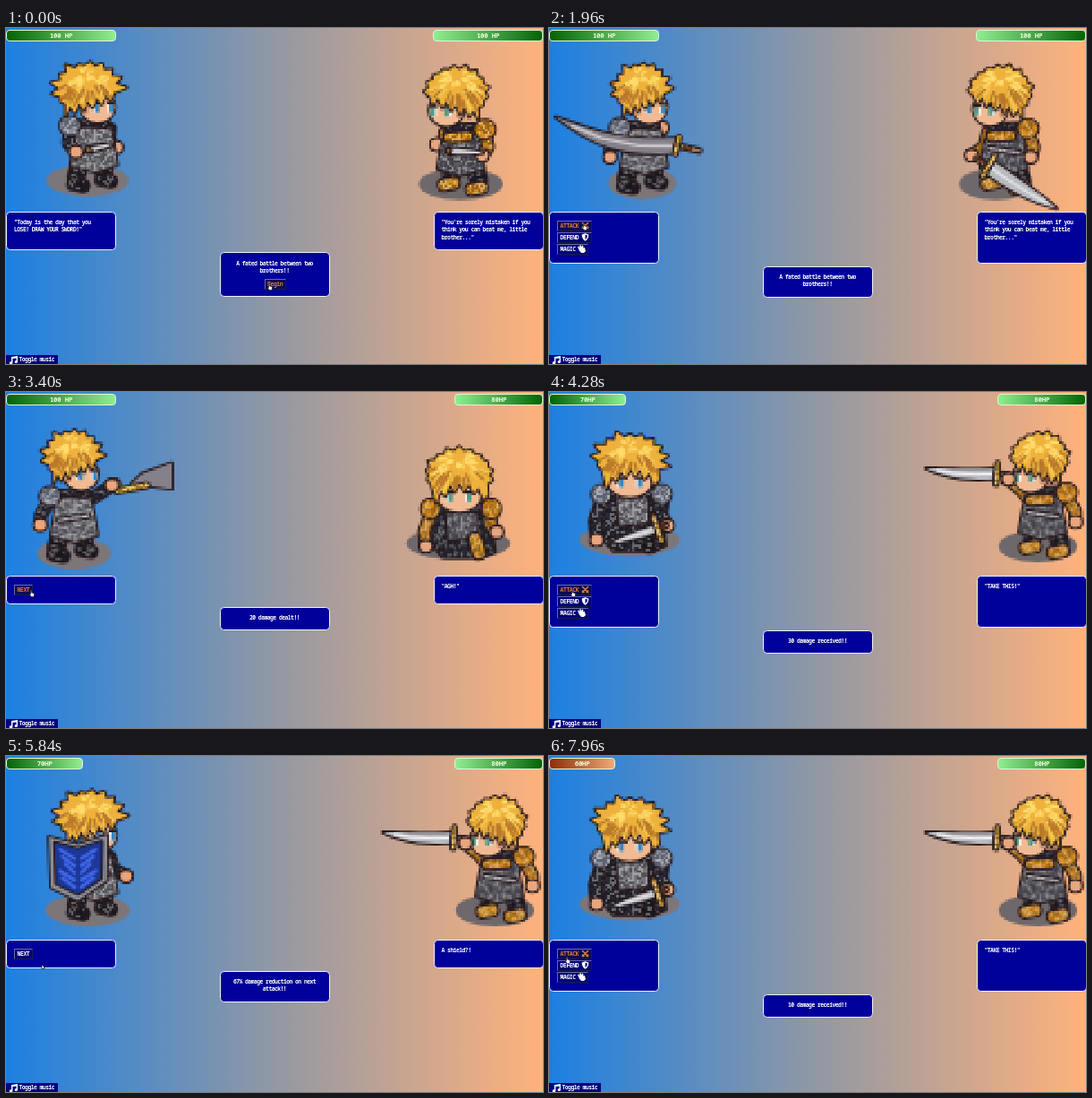
Write an HTML page with a canvas that moves like this. It is 600 px wide and 375 px high and loops after 8 s.

```html
<!DOCTYPE html>
<html lang="en">
<head>
<meta charset="utf-8">
<title>Battle of two brothers</title>
<style>
html, body { margin: 0; width: 100%; height: 100%; overflow: hidden; }
#stage { position: relative; width: 600px; height: 375px; overflow: hidden;
  background: linear-gradient(90deg, #1c80e2, #9298a4 50%, #ffb27c);
  font: 600 6.4px/8.2px 'Noto Sans Mono', 'DejaVu Sans Mono', monospace; letter-spacing: -.54px; color: #fff; }
#stage div, canvas, #cursor { position: absolute; box-sizing: border-box; white-space: pre; }
canvas { left: 0; top: 0; width: 600px; height: 375px; image-rendering: pixelated; }
.box { background: #00009a; border: 1.3px solid #f0f0fa; border-radius: 4.5px; padding: 7.6px 8px 0; width: 123px; }
.hp { top: 2.3px; height: 13px; border: 1.2px solid #dff5d8; border-radius: 4px; text-align: center;
  font-size: 7.4px; line-height: 10.6px; letter-spacing: -.24px; color: #eefadc; }
#stage .btn { background: #000078; border: 1px solid #1a1a50; border-top-color: #6c6c9c; border-left-color: #6c6c9c;
  height: 12px; line-height: 9.6px; padding-left: 2.4px; letter-spacing: -.34px; }
#stage .btn.hover { color: #dc7c38; background: #0c0a58; }
.btn svg { position: absolute; right: 2px; top: .6px; width: 9px; height: 9px; }
#music { left: 0; top: 365px; width: 57.5px; height: 10px; background: #000082; line-height: 10px; padding-left: 14.5px; }
#music svg { position: absolute; left: 2.5px; top: .5px; width: 10px; height: 9px; }
#cursor { left: 0; top: 0; width: 6px; height: 8px; }
</style>
</head>
<body>
<div id="stage">
  <canvas id="fighters" width="240" height="150"></canvas>
  <div id="ui"></div>
  <div id="music"><svg viewBox="0 0 10 9"><path d="M3 1 10 0V6.5A1.7 1.4 0 1 1 8.6 5.3V2.4L4.4 3V7.7A1.8 1.4 0 1 1 3 6.4Z" fill="#fff"/></svg>Toggle music</div>
  <svg id="cursor" viewBox="0 0 6 8"><path fill="#fff" stroke="#111" stroke-width=".6"/></svg>
</div>
<script>
const LOOP = 8000, PIXEL = 2.5, OUTLINE = '#281a1e';
const $ = id => document.getElementById(id);
const ctx = $('fighters').getContext('2d');
const lerp = (a, b, u) => a + (b - a) * u;

function randomizer(seed) {
  return () => (seed = seed * 16807 % 2147483647) / 2147483647;
}

// Light and dark cells laid over armour and cloth.
const grain = (() => {
  const tile = document.createElement('canvas'), cells = 16, rnd = randomizer(77);
  tile.width = tile.height = cells * PIXEL;
  const c = tile.getContext('2d');
  for (let i = 0; i < cells * cells; i++) {
    const v = rnd();
    c.fillStyle = v < .4 ? 'rgba(0,0,0,.3)' : v > .7 ? 'rgba(255,255,240,.3)' : 'transparent';
    c.fillRect(i % cells * PIXEL, Math.floor(i / cells) * PIXEL, PIXEL, PIXEL);
  }
  return ctx.createPattern(tile, 'repeat');
})();

// ---- drawing helpers ----
function trace(points) {
  const path = new Path2D();
  points.forEach(([x, y]) => path.lineTo(x, y));
  path.closePath();
  return path;
}

function shape(color, path, textured = true) {
  ctx.strokeStyle = OUTLINE;
  ctx.lineWidth = 4.5;
  ctx.stroke(path);
  for (const fill of textured ? [color, grain] : [color]) {
    ctx.fillStyle = fill;
    ctx.fill(path);
  }
}

function blob(color, x, y, rx, ry, textured) {
  const path = new Path2D();
  path.ellipse(x, y, rx, ry, 0, 0, 7);
  shape(color, path, textured);
}

function limb(color, width, ...points) {
  const path = new Path2D();
  points.forEach(([x, y]) => path.lineTo(x, y));
  for (const [style, w] of [[OUTLINE, width + 4.5], [color, width], [grain, width]]) {
    ctx.strokeStyle = style;
    ctx.lineWidth = w;
    ctx.stroke(path);
  }
}

function rect(color, x, y, w, h) {
  ctx.fillStyle = color;
  ctx.fillRect(x, y, w, h);
}

function shadow(x, y, rx, color = '#7d7678') {
  ctx.fillStyle = color;
  ctx.beginPath();
  ctx.ellipse(x, y, rx, 18, 0, 0, 7);
  ctx.fill();
}

const fist = (x, y) => blob('#e8a67e', x, y, 6.5, 6, false);

// A tapered, bowed blade with a crossguard and a grip behind it.
function sword([hx, hy], [tx, ty], { width, bow = 0, color = '#b8babf', guard = 9, grip = 8 }) {
  const len = Math.hypot(tx - hx, ty - hy), ux = (tx - hx) / len, uy = (ty - hy) / len;
  const at = (u, side) => {
    const off = bow * Math.sin(Math.PI * u) + side * width / 2 * (1 - u ** 3);
    return [lerp(hx, tx, u) - uy * off, lerp(hy, ty, u) + ux * off];
  };
  const steps = [...Array(9)].map((_, i) => i / 8);
  shape(color, trace([...steps.map(u => at(u, 1)), ...steps.reverse().map(u => at(u, -1))]), false);
  ctx.strokeStyle = 'rgba(255,255,255,.55)';
  ctx.lineWidth = width / 5;
  ctx.stroke(trace([at(.05, 0), at(.3, 0), at(.6, 0), at(.85, 0), at(.6, 0), at(.3, 0)]));
  limb('#6f4428', 4, [hx, hy], [hx - ux * grip, hy - uy * grip]);
  limb('#d9a63c', 4, [hx - uy * guard, hy + ux * guard], [hx + uy * guard, hy - ux * guard]);
}

// ---- fighters, drawn facing right around the neck ----
const hero = { pad: '#868c9c', sleeve: '#2b2a36', boot: '#211e26', torso: '#76757d', eye: '#3584bc', spike: .3, seed: 5 };
const foe = { pad: '#d88c22', sleeve: '#c07e24', boot: '#cf8c2a', torso: '#5d5b64', eye: '#4f9a86', spike: .12, seed: 9 };

function hair(look, rx, ry, front) {
  const rnd = randomizer(look.seed), points = [], tufts = 22;
  for (let i = 0; i <= tufts; i++) {
    const a = Math.PI * lerp(front ? .88 : .78, front ? 2.12 : 2.04, i / tufts);
    const r = i % 2 ? 1 + look.spike * rnd() : .93;
    points.push([Math.cos(a) * rx * r, Math.sin(a) * ry * r]);
  }
  for (let i = 0; i <= 11; i++) {
    const u = i / 11, low = front ? .42 + .5 * (2 * u - 1) ** 2 : lerp(.2, .85, u);
    points.push([lerp(.9, -.72, u) * rx, ry * (low + (i % 2 ? .22 : -.12))]);
  }
  const dome = trace(points);
  shape('#eeb23c', dome, false);
  ctx.save();
  ctx.clip(dome);
  ctx.lineWidth = 3;
  for (let i = 0; i < 60; i++) {
    const a = rnd() * 2 * Math.PI, r = .25 + .7 * rnd(), x = Math.cos(a) * r * rx, y = Math.sin(a) * r * ry;
    ctx.strokeStyle = y + rnd() * 14 < 2 ? '#ffdc6c' : rnd() < .6 ? '#b9782a' : '#f6c850';
    ctx.beginPath();
    ctx.moveTo(x * .75, y * .75 - 4);
    ctx.lineTo(x * 1.1, y * 1.1 + 3);
    ctx.stroke();
  }
  ctx.restore();
}

function head(look, x, y, rx = 34, front = false) {
  const fx = front ? 0 : rx * .33, fy = front ? 24 : 20;
  ctx.save();
  ctx.translate(x, y);
  blob('#f0bb94', fx, fy, front ? 24 : 19, 17, false);
  if (!front) rect('#c08460', fx - 17, fy - 2, 6, 10);
  for (const ex of front ? [-12, 9] : [fx - 3, fx + 13]) {
    rect('#fff', ex - 2, fy - 3, 4, 9);
    rect(look.eye, ex, fy - 3, 5, 9);
    rect(OUTLINE, ex - 3, fy - 6, 9, 3);
  }
  hair(look, rx, 28, front);
  ctx.restore();
}

// Both arms run shoulder, elbow, hand; the far arm lies behind the body.
function arm(look, shoulder, hand) {
  const elbow = [lerp(shoulder[0], hand[0], .5) - 5, lerp(shoulder[1], hand[1], .5) + 3];
  limb(look.sleeve, 11, shoulder, elbow, hand);
  fist(...hand);
}

function stand(look, x, y, { dir = 1, near, far, hairX = -7, hairY = -35, rx }) {
  ctx.save();
  ctx.translate(x, y);
  ctx.scale(dir, 1);
  arm(look, [18, 10], far);
  for (const [hip, foot, ground] of [[-14, -20, 71], [10, 11, 66]]) {
    limb('#26232c', 17, [hip, 42], [foot, ground - 8]);
    limb(look.boot, 12, [foot - 3, ground], [foot + 8, ground + 2]);
  }
  shape(look.torso, trace([[-20, 2], [16, 2], [22, 26], [26, 50], [0, 57], [-26, 50], [-22, 26]]));
  limb('#b4b4b8', 3, [-17, 33], [16, 28]);
  limb('#2a2630', 6, [-16, 3], [14, 4]);
  if (look === foe) limb(look.pad, 9, [-8, 14], [14, 15]);
  arm(look, [-27, 10], near);
  blob(look.pad, -27, 6, 11, 10);
  head(look, hairX, hairY, rx);
  ctx.restore();
}

function kneel(look, x, y, depth) {
  ctx.save();
  ctx.translate(x, y);
  shape('#2b2933', trace([[-30, -8], [30, -8], [38, depth - 6], [24, depth], [-20, depth], [-34, depth - 16]]));
  shape(look.torso, trace([[-16, 4], [18, 4], [18, 30], [-14, 34]]));
  arm(look, [-33, 2], [-39, depth - 12]);
  arm(look, [36, 2], [40, depth - 28]);
  limb(look.boot, 13, [16, depth - 20], [20, depth - 5]);
  for (const side of [-1, 1]) blob(look.pad, side * 34, -1, 10, 10);
  head(look, -2, -39, 36, true);
  ctx.restore();
}

function shield(cx, cy) {
  const rim = [[-32, -34], [0, -25], [33, -36], [32, 15], [0, 37], [-30, 22]];
  const sized = k => trace(rim.map(([x, y]) => [cx + x * k, cy + y * k]));
  shape('#8b8e98', sized(1), false);
  shape('#1c3794', sized(.8), false);
  ctx.strokeStyle = '#3f66ea';
  ctx.lineWidth = 4;
  for (const side of [-1, 1]) for (let i = 0; i < 5; i++) {
    ctx.beginPath();
    ctx.moveTo(cx + side * 4, cy - 10 + i * 8);
    ctx.lineTo(cx + side * (20 - i % 3 * 3), cy - 20 + i * 8);
    ctx.stroke();
  }
}

const FOE_SHADE = '#6f686a';
const poses = {
  rest() {
    shadow(91, 170, 46);
    stand(hero, 98, 103, { near: [-20, 35], far: [25, 30] });
    sword([92, 136], [120, 129], { width: 5, guard: 0, grip: 0 });
  },
  ready() {
    shadow(104, 173, 38);
    stand(hero, 106, 105, { near: [-38, 39], far: [20, 6], hairX: -3, hairY: -36, rx: 28 });
    sword([143, 131], [7, 99], { width: 17, bow: -12, color: '#85818a', grip: 25 });
  },
  strike() {
    shadow(76, 180, 41);
    stand(hero, 76, 110, { near: [-38, 38], far: [44, -7], hairX: -2, hairY: -38, rx: 29 });
    shape('#85818a', trace([[140, 102], [152, 91], [185, 79], [185, 108]]), false);
    limb('#d9a63c', 5, [124, 110], [157, 104]);
    fist(118, 104);
  },
  kneel() {
    shadow(90, 165, 56);
    kneel(hero, 92, 115, 62);
    sword([121, 152], [70, 168], { width: 8, guard: 14, grip: 10 });
  },
  guard() {
    shadow(91, 172, 47);
    stand(hero, 98, 103, { near: [-20, 35], far: [36, 31], hairX: -5 });
    shield(80, 124);
  },
  foeRest() {
    shadow(508, 174, 47, FOE_SHADE);
    stand(foe, 508, 107, { dir: -1, near: [-24, 35], far: [27, 23], hairX: 5 });
    sword([494, 137], [533, 139], { width: 6, guard: 0, grip: 0 });
  },
  foeReady() {
    shadow(499, 174, 41, FOE_SHADE);
    stand(foe, 508, 106, { dir: -1, near: [-30, 38], far: [36, 36], hairX: 4 });
    sword([491, 154], [567, 201], { width: 16, bow: 2, guard: 13, grip: 16 });
  },
  foeStrike() {
    shadow(546, 172, 44, FOE_SHADE);
    stand(foe, 551, 106, { dir: -1, near: [-37, 39], far: [38, -9], hairX: 3, hairY: -32, rx: 31 });
    sword([500, 91], [421, 85], { width: 12, bow: -3, guard: 11, grip: 9 });
    fist(513, 97);
  },
  foeKneel() {
    shadow(505, 169, 58, FOE_SHADE);
    kneel(foe, 508, 131, 53);
  }
};

// ---- interface ----
const icons = {
  ATTACK: '<path d="M1 1 8 8M8 1 1 8M1 5.6 3.4 8M8 5.6 5.6 8" stroke="currentColor" stroke-width="1.5"/>',
  DEFEND: '<path d="M4.5.3 8.3 1.6Q8.4 6.6 4.5 8.8.6 6.6.7 1.6Z" fill="currentColor"/><path d="M4.5 1.8V7.3Q7 5.5 7 2.6Z" fill="#000078"/>',
  MAGIC: '<path d="M0 2 1.2 1.4 2.4 3.4 2.2.5 3.6.3 4.3 2.8 5 .6 6.3 1 6.3 3.4 7.8 3 9 7 7 9H4L1.8 6.6Z" fill="currentColor"/>'
};
const MENU = Object.keys(icons), NEXT = ['NEXT'];
const TITLE = 'A fated battle between two\nbrothers!!';
const REPLY = '"You\'re sorely mistaken if you\nthink you can beat me, little\nbrother..."';

const scenes = [
  { at: 0, poses: ['rest', 'foeRest'], hp: [100, 100], said: '"Today is the day that you\nLOSE! DRAW YOUR SWORD!"', reply: REPLY, news: TITLE, buttons: ['Begin'] },
  { at: 480, poses: ['ready', 'foeReady'], hp: [100, 100], reply: REPLY, news: TITLE, buttons: MENU },
  { at: 2200, poses: ['strike', 'foeKneel'], hp: [100, 80], reply: '"AGH!"', news: '20 damage dealt!!', buttons: NEXT },
  { at: 3640, poses: ['kneel', 'foeStrike'], hp: [70, 80], reply: '"TAKE THIS!"', news: '30 damage received!!', buttons: MENU },
  { at: 5320, poses: ['guard', 'foeStrike'], hp: [70, 80], reply: 'A shield?!', news: '67% damage reduction on next\nattack!!', buttons: NEXT },
  { at: 6640, poses: ['kneel', 'foeStrike'], hp: [60, 80], reply: '"TAKE THIS!"', news: '10 damage received!!', buttons: MENU }
];

const div = (cls, css, html = '') => `<div class="${cls}" style="${css}">${html}</div>`;
const textHeight = text => text.split('\n').length * 8.2 + 18.6;

function hpBar(value, right) {
  const colors = value > 60 ? '#046404,#90ee90' : '#8c2e08,#f0a878';
  return div('hp', `${right ? 'right:-600px' : 'left:0'};width:${1 + value * 1.22}px;background:linear-gradient(${right ? 270 : 90}deg,${colors})`,
    value + (value === 100 ? ' HP' : 'HP'));
}

function buttonBox(name, i) {
  const begin = name === 'Begin';
  return { name, x: begin ? 288.5 : 9, y: begin ? 280 : 214.5 + 13 * i, w: name.length * 3.5 + (icons[name] ? 17.5 : 7) };
}

function build(s) {
  const panel = s.said ? textHeight(REPLY) : 19.5 + 13 * s.buttons.length;
  const side = (x, text) => div('box', `left:${x}px;top:204.6px;height:${panel}px`, text);
  s.boxes = s.boxes || s.buttons.map(buttonBox);
  $('ui').innerHTML = hpBar(s.hp[0]) + hpBar(s.hp[1], true) + side(0, s.said) + side(477.5, s.reply)
    + div('box', `left:238.5px;top:${207.1 + panel}px;height:${textHeight(s.news) + (s.said ? 15 : 0)}px;text-align:center`, s.news)
    + s.boxes.map(b => div('btn', `left:${b.x}px;top:${b.y}px;width:${b.w}px`,
      b.name + (icons[b.name] ? `<svg viewBox="0 0 9 9">${icons[b.name]}</svg>` : ''))).join('');

  ctx.setTransform(1, 0, 0, 1, 0, 0);
  ctx.clearRect(0, 0, 240, 150);
  ctx.scale(1 / PIXEL, 1 / PIXEL);
  ctx.lineJoin = 'round';
  ctx.lineCap = 'round';
  s.poses.forEach(name => poses[name]());
}

// The pointer rests at each stop and leaves in time to reach the next: [arrival, x, y].
const GLIDE = 600;
const stops = [[0, 295, 288], [1120, 117, 240], [1720, 40, 221], [2800, 29, 224], [4240, 27, 224], [5080, 42, 235], [6480, 24, 223], [7400, 21, 227]];
const HAND = 'M1.5.5H2.6V3L5.4 3.7V6.3L4.6 7.6H2.2L.4 5 1.5 4.6Z';
const ARROW = 'M1 1V5.6L2.1 4.8 2.9 6.3 3.8 5.8 3.1 4.4H4.4Z';

function pointer(t) {
  const i = stops.findLastIndex(s => s[0] <= t);
  const [, x0, y0] = stops[i], [arrival, x1, y1] = stops[i + 1] || [Infinity, x0, y0];
  const u = Math.max(0, 1 - (arrival - t) / GLIDE), k = u * u * (3 - 2 * u);
  return [lerp(x0, x1, k), lerp(y0, y1, k)];
}

let shown;
const start = performance.now();

function frame() {
  const t = (performance.now() - start) % LOOP;
  const scene = scenes.findLast(s => s.at <= t);
  if (scene !== shown) build(shown = scene);
  const [x, y] = pointer(t);
  const over = scene.boxes.findIndex(b => x >= b.x && x <= b.x + b.w && y - 2 >= b.y && y - 2 <= b.y + 12);
  document.querySelectorAll('.btn').forEach((el, i) => el.classList.toggle('hover', i === over));
  $('cursor').style.transform = `translate(${x - 3}px,${y - 3}px)`;
  $('cursor').firstChild.setAttribute('d', over < 0 ? ARROW : HAND);
  requestAnimationFrame(frame);
}
frame();
</script>
</body>
</html>
```
